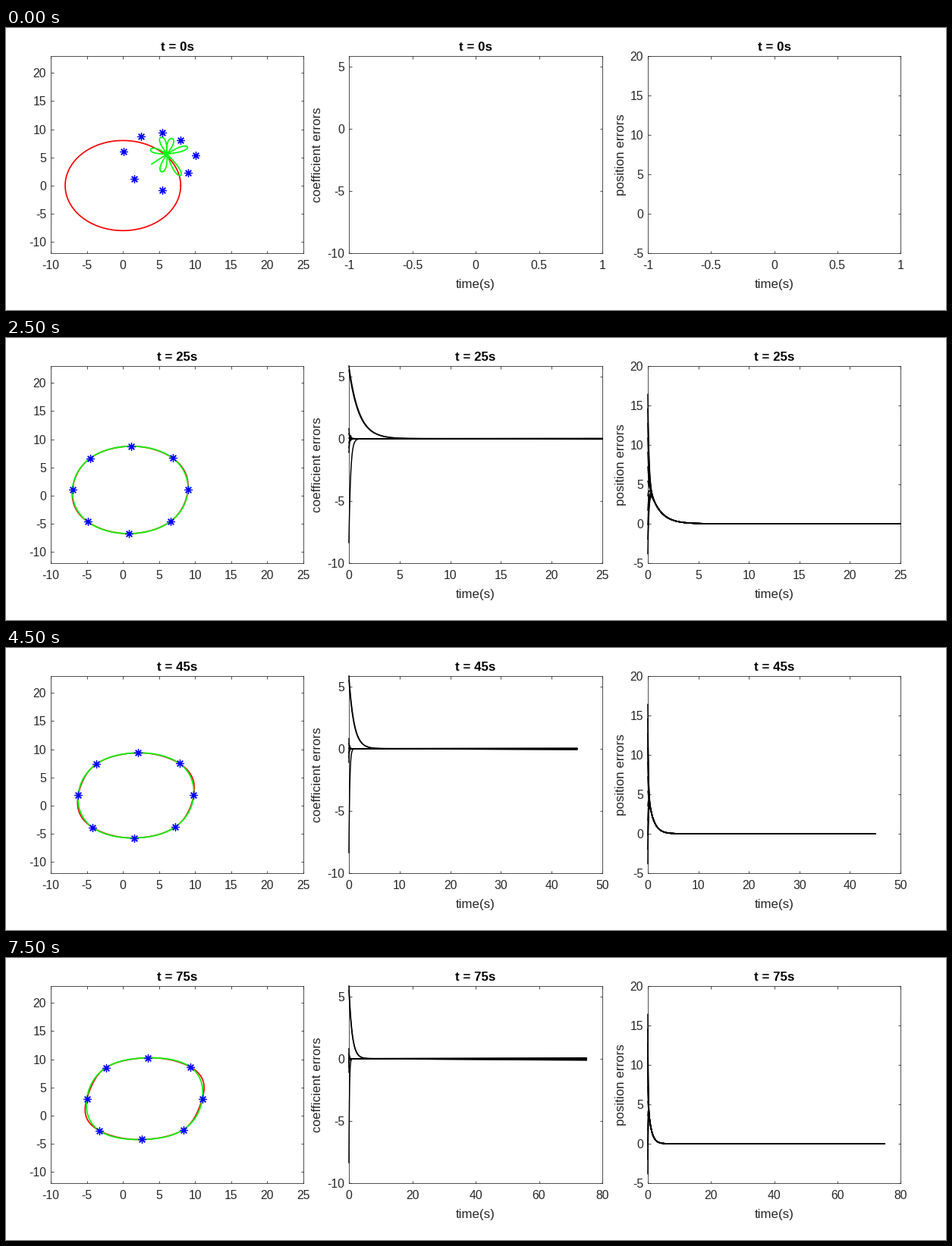
Recreate the animation shown at these times as a matplotlib script. Size 1239 by 372 pixels, loop 8000 ms.

```python
import matplotlib.pyplot as plt
import numpy as np
from matplotlib.animation import FuncAnimation

W, H, DPI = 1239, 372, 72          # at 72 dpi one point is one pixel
TOP, BOTTOM = 37, 297
FRAMES, INTERVAL, STEP = 16, 500, 5
INK = (0.15, 0.15, 0.15)

plt.rcParams.update({"font.family": "Liberation Sans",
                     "axes.unicode_minus": False,
                     "path.simplify": False})
fig = plt.figure(figsize=((W + 0.01) / DPI, (H + 0.01) / DPI), dpi=DPI,
                 facecolor="white")


def put(x, y, s, **kw):
    """Text at pixel position, measured from the top left."""
    kw = {"ha": "center", "va": "baseline", "size": 16.9, "color": INK, **kw}
    return fig.text(x / W, 1 - y / H, s, **kw)


def ticks(axis, values):
    axis.set_ticks(values, [f"{v:g}" for v in values])


def panel(left, width, ylim, yticks, ylabel="", gap=0):
    ax = fig.add_axes([left / W, 1 - BOTTOM / H, width / W, (BOTTOM - TOP) / H])
    ax.set_ylim(ylim)
    ax.tick_params(direction="in", length=3.5, width=0.8, color=INK,
                   labelcolor=INK, labelsize=15.8, top=True, right=True)
    ax.tick_params(axis="x", pad=9)
    ax.tick_params(axis="y", pad=6)
    for spine in ax.spines.values():
        spine.set(color=INK, linewidth=0.8)
    ticks(ax.yaxis, yticks)
    mid = left + width / 2
    if ylabel:
        put(mid, 343, "time(s)")
        put(left - gap, 167.5, ylabel, rotation=90, rotation_mode="anchor")
    title = put(mid, 30, "", weight="bold", color="black")
    return ax, title


shape_ax, title1 = panel(59, 333, (-12, 23), range(-10, 21, 5))
coef_ax, title2 = panel(452, 334, (-10, 5.83), range(-10, 6, 5),
                        "coefficient errors", gap=37)
pos_ax, title3 = panel(846, 333, (-5, 20), range(-5, 21, 5),
                       "position errors", gap=31.5)
shape_ax.set_xlim(-10, 25)
ticks(shape_ax.xaxis, range(-10, 26, 5))

# --- moving, slowly deforming outline ---------------------------------
THETA = np.linspace(0, 2 * np.pi, 361)
NODES = np.arange(8) * np.pi / 4


def harmonics(th):
    return [(np.cos(n * th), np.sin(n * th)) for n in (1, 2, 3, 5)]


def outline(th, t, ripple=0):
    """Drifting circle; the ripple vanishes at the eight nodes."""
    (c, s), _, (c3, s3), (c5, s5) = harmonics(th)
    k = t / 75
    wave = 0.12 * (s3 + s5) + 0.11 * (c3 - c5)
    x = 8 * c + k * (0.55 * s + 0.12 * (s3 + c - c3) + ripple * wave)
    y = 8 * s + k * (-0.42 * s + 0.32 * s3 + 0.05 * (c - c3))
    return x + 0.04 * t, y + 0.04 * t


def start_ring(th):
    (c, s), (c2, s2), (c3, s3), _ = harmonics(th)
    x = 5.27 + 4.8 * c - 0.19 * c2 - 0.5 * s2 + 0.22 * c3
    y = (5.02 - 0.13 * c + 4.91 * s + 0.68 * c2 - 0.44 * s2
         - 0.27 * c3 - 0.2 * s3)
    return x, y


def flower(center=6.1 + 5.6j):
    """First guess of the outline: a short tail, then petals."""
    petals = [(24, 3.1), (-64, 4.25), (-103, 3.25),
              (160, 2.4), (105, 3.1), (76, 2.85)]      # degrees, length
    u = np.linspace(0, np.pi, 40)
    path = [[3.98 + 3.82j]]
    for angle, length in petals:
        loop = length * np.sin(u) + 0.4j * np.sin(2 * u)
        path.append(center + loop * np.exp(1j * np.radians(angle)))
    z = np.concatenate(path)
    return z.real, z.imag


red, = shape_ax.plot([], [], color="#ff0000", lw=1.7)
green, = shape_ax.plot([], [], color="#00ff00", lw=1.7)
stars, = shape_ax.plot([], [], ls="", marker=(8, 2, 0), ms=10.5, mew=1.3,
                       color="#0000ff")


# --- error curves ------------------------------------------------------
def coef_errors(t):
    rows = [5.83 * np.exp(-t), 5.5 * np.exp(-t), -8.35 * np.exp(-6 * t)]
    ring = np.exp(-9 * t) * np.cos(18 * t)
    for f in np.linspace(0, 1, 6):
        rows.append((1.9 * f - 1.1) * ring + (0.19 * f - 0.13) * t / 75)
    return rows


def pos_errors(t):
    return [5.4 * np.exp(-t) + (v - 5.4) * np.exp(-9 * t)
            for v in np.linspace(-3.8, 16.4, 12)]


def empty_lines(ax, errors):
    return [ax.plot([], [], color="black", lw=1.5, clip_on=False, zorder=3)[0]
            for _ in errors(np.zeros(1))]


plots = [(ax, empty_lines(ax, errors), errors)
         for ax, errors in ((coef_ax, coef_errors), (pos_ax, pos_errors))]


def time_marks(t):
    """Round tick positions from zero past t, at most six steps."""
    step = next(s for s in (1, 2, 5, 10, 20) if t <= 6 * s)
    return step * np.arange(np.ceil(t / step) + 1)


def update(i):
    t = i * STEP
    for title in (title1, title2, title3):
        title.set_text(f"t = {t}s")

    red.set_data(*outline(THETA, t, ripple=1))
    green.set_data(*(outline(THETA, t) if t else flower()))
    stars.set_data(*(outline(NODES, t) if t else start_ring(NODES)))

    marks = time_marks(t) if t else np.linspace(-1, 1, 5)
    time = t * np.linspace(0, 1, 700 if t else 0) ** 3
    for ax, lines, errors in plots:
        ax.set_xlim(marks[0], marks[-1])
        ticks(ax.xaxis, marks)
        for line, values in zip(lines, errors(time)):
            line.set_data(time, values)
    return []


anim = FuncAnimation(fig, update, frames=FRAMES, interval=INTERVAL,
                     init_func=lambda: update(0), repeat=True, repeat_delay=0)
plt.show()
```
